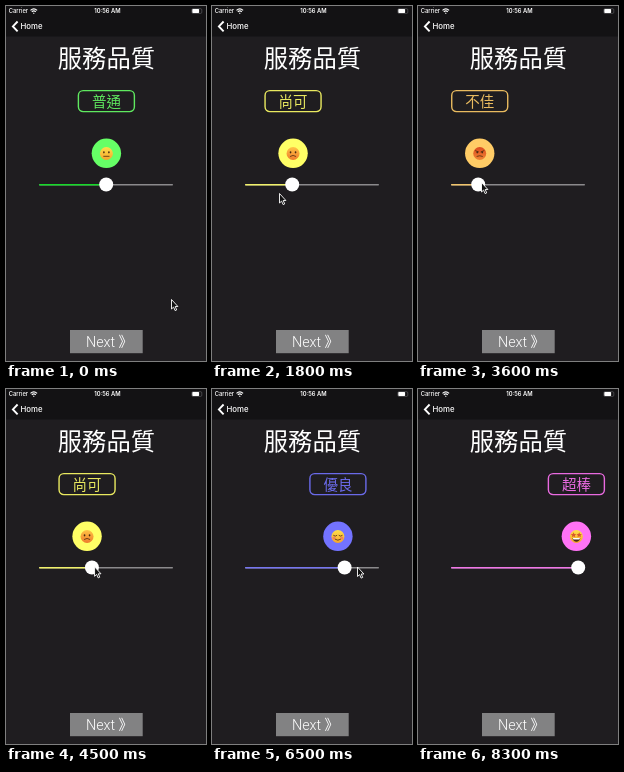
An HTML page for the animation above (9000 ms loop, 200 px wide and 355 px high).

```html
<!DOCTYPE html>
<html lang="zh-TW">
<head>
<meta charset="utf-8">
<title>服務品質</title>
<style>
  html, body { margin: 0; width: 100%; height: 100%; overflow: hidden; background: #1f1d20; }
  svg { display: block; width: 100vw; height: 100vh; }
  text { fill: #fff; font-family: Inter, Roboto, sans-serif; }
  .cjk { font-family: "Noto Sans CJK TC", "Noto Sans CJK", sans-serif; }
  .next { font-family: Roboto, "Noto Sans CJK TC", sans-serif; font-weight: 300; }
  .line { fill: none; stroke: #5a3210; stroke-width: .85; stroke-linecap: round; }
  .dark { fill: #4a2c12; }
</style>
</head>
<body>
<svg viewBox="0 0 200 355" preserveAspectRatio="none">
  <defs>
    <linearGradient id="sun" x2="0" y2="1"><stop stop-color="#ffe04a"/><stop offset="1" stop-color="#f5a52c"/></linearGradient>
    <linearGradient id="warm" x2="0" y2="1"><stop stop-color="#ffc445"/><stop offset="1" stop-color="#ee7a2c"/></linearGradient>
    <linearGradient id="rage" x2="0" y2="1"><stop stop-color="#dc4a20"/><stop offset="1" stop-color="#ee8434"/></linearGradient>
    <linearGradient id="fume" x2="0" y2="1"><stop stop-color="#b8682a"/><stop offset="1" stop-color="#dca238"/></linearGradient>
  </defs>

  <rect width="200" height="355" fill="#1f1d20"/>
  <rect width="200" height="30.5" fill="#131214"/>

  <text x="2.8" y="7.2" font-size="5.8" font-weight="500">Carrier</text>
  <g fill="none" stroke="#fff" stroke-width="1.2">
    <path d="M24.5 4.4Q27.8 1.5 31.1 4.4M25.8 5.8Q27.8 4.1 29.8 5.8"/>
    <path d="M27 7.2l.8-.8.8.8-.8.7z" fill="#fff" stroke="none"/>
    <path d="M11.6 15.5L6.9 20.4l4.7 4.9" stroke-width="1.9"/>
  </g>
  <text x="101.4" y="7.2" font-size="5.8" font-weight="600" text-anchor="middle">10:56 AM</text>
  <rect x="185.8" y="2.7" width="10" height="4.7" rx="1.2" fill="none" stroke="#77767a" stroke-width=".5"/>
  <rect x="186.3" y="3.1" width="6.8" height="3.9" rx=".7" fill="#fff"/>
  <text x="14.5" y="23.2" font-size="7.8" font-weight="500">Home</text>

  <text class="cjk" x="100.4" y="60.8" font-size="24.3" text-anchor="middle">服務品質</text>

  <g id="badge">
    <rect id="frame" x="-28" y="84.6" width="56" height="21" rx="4.8" fill="none" stroke-width="1.4" opacity=".9"/>
    <text id="word" class="cjk" y="100.5" font-size="14.5" font-weight="300" text-anchor="middle" opacity=".9"></text>
    <circle id="disc" cy="147.3" r="14.7"/>
    <g id="face" transform="translate(0 147.5)"></g>
  </g>

  <rect x="33" y="178" width="134" height="1.5" rx=".7" fill="#8b8a8c"/>
  <rect id="track" x="33" y="178" height="1.5" rx=".7" opacity=".88"/>
  <circle id="thumb" cy="178.5" r="7" fill="#fff"/>

  <rect x="64" y="324" width="72.7" height="23.2" fill="#828283"/>
  <text class="next" x="80" y="340.8" font-size="14.3">Next 》</text>

  <path id="cursor" d="M.5 .5V10l2.1-1.9 1.5 3.5 1.6-.7-1.5-3.4h2.7z" fill="#111" stroke="#fff" stroke-width=".9"/>
</svg>
<script>
const LOOP = 9000, STEP = 100, SLIDE = 200, TOUCH = 900, HIDE = 8300;
const $ = id => document.getElementById(id);

// Face parts; a pair is one part plus its mirror image.
const pair = part => part + `<g transform="scale(-1 1)">${part}</g>`;
const line = d => `<path class="line" d="${d}"/>`;
const eyes = pair('<ellipse class="dark" cx="2.5" cy="-1.2" rx=".85" ry="1.1"/>');
const brows = pair(line('M4.2-2.8L1.2-1.6'));
const mouth = bend => line(`M-2.7 2.8Q0 ${2.8 + bend} 2.7 2.8`);
const head = (fill, ...parts) => `<circle r="6.5" fill="url(#${fill})"/>` + parts.join('');

const levels = [
  { word: '極差', color: '#ff2d87', face: head('fume', brows, eyes, '<rect class="dark" x="-4.4" y="1" width="8.8" height="3.6" rx="1.2"/>') },
  { word: '不佳', color: '#ffcc66', face: head('rage', brows, eyes, mouth(-1.2)) },
  { word: '尚可', color: '#ffff66', face: head('warm', eyes, mouth(-2)) },
  { word: '普通', color: '#66ff66', face: head('sun', eyes, mouth(0)) },
  { word: '良好', color: '#66ccff', face: head('sun', eyes, mouth(2)) },
  { word: '優良', color: '#7373ff', face: head('sun', pair('<circle cx="4" cy="1.6" r="1.5" fill="#f0845c"/>' + line('M1.1-1Q2.6.5 4.3-1')), mouth(2)) },
  { word: '超棒', color: '#ff73f5', face: head('sun', pair('<path fill="#d8572c" d="M2.8-4.2l.8 1.8 1.9.1-1.4 1.2.4 1.8-1.7-1-1.7 1 .4-1.8L.1-2.3 2-2.4z"/>'),
      '<path class="dark" d="M-4 1.4H4Q3 5.2 0 5.2T-4 1.4z"/><path fill="#fff" d="M-3.6 1.5H3.6L3 2.9H-3z"/>') }
];

// Stops of the drag: [time, level]
const drag = [[1000, 3], [1800, 2], [2000, 1], [2360, 1], [2800, 0], [3200, 0], [3600, 1], [5000, 3], [5420, 3], [7420, 6]];
// Stops of the pointer: [time, x, y]
const pointer = [[0, 165, 293], [TOUCH, 102, 180], [1800, 67, 187], [2600, 41, 189], [3100, 46, 174],
  [3600, 63, 176], [5000, 102, 178], [5400, 102, 178], [6500, 145, 177.5], [7400, 164, 178], [8200, 172, 218]];

function along(path, t, axis = 1) {
  const i = path.findIndex(p => p[0] > t);
  if (i < 0) return path[path.length - 1][axis];
  if (i === 0) return path[0][axis];
  const a = path[i - 1], b = path[i];
  return a[axis] + (b[axis] - a[axis]) * (t - a[0]) / (b[0] - a[0]);
}

// The badge snaps to the nearest level: note when that level changes.
const snaps = [{ at: 0, level: 3, from: 3 }];
for (let t = 0; t < LOOP; t += 10) {
  const from = snaps[snaps.length - 1].level, level = Math.round(along(drag, t));
  if (level !== from) snaps.push({ at: t, level, from });
}

const ease = p => p < .5 ? 2 * p * p : 1 - 2 * (1 - p) ** 2;
const badgeX = level => 42.4 + level * 19.33;
const thumbX = level => 40.2 + level * 20;
let shown = -1;

function showLevel(level) {
  if (shown === level) return;
  shown = level;
  const { word, color, face } = levels[level];
  $('word').textContent = word;
  $('word').style.fill = color;
  $('frame').setAttribute('stroke', color);
  $('disc').setAttribute('fill', color);
  $('face').innerHTML = face;
}

function draw(t) {
  const { at, level, from } = snaps.filter(s => s.at <= t).pop();
  const p = ease(Math.min(1, (t - at) / SLIDE));
  showLevel(level);
  $('badge').setAttribute('transform', `translate(${badgeX(from + (level - from) * p)} 0)`);

  const x = thumbX(along(drag, t));
  $('thumb').setAttribute('cx', x);
  $('track').setAttribute('width', x - 33);
  $('track').setAttribute('fill', t < TOUCH ? '#06e51c' : levels[level].color);

  $('cursor').setAttribute('transform', `translate(${along(pointer, t)} ${along(pointer, t, 2)})`);
  $('cursor').style.display = t < HIDE ? '' : 'none';
}

const start = performance.now();
function tick() {
  const t = (performance.now() - start) % LOOP;
  draw(Math.floor(t / STEP) * STEP);
  requestAnimationFrame(tick);
}
tick();
</script>
</body>
</html>
```
